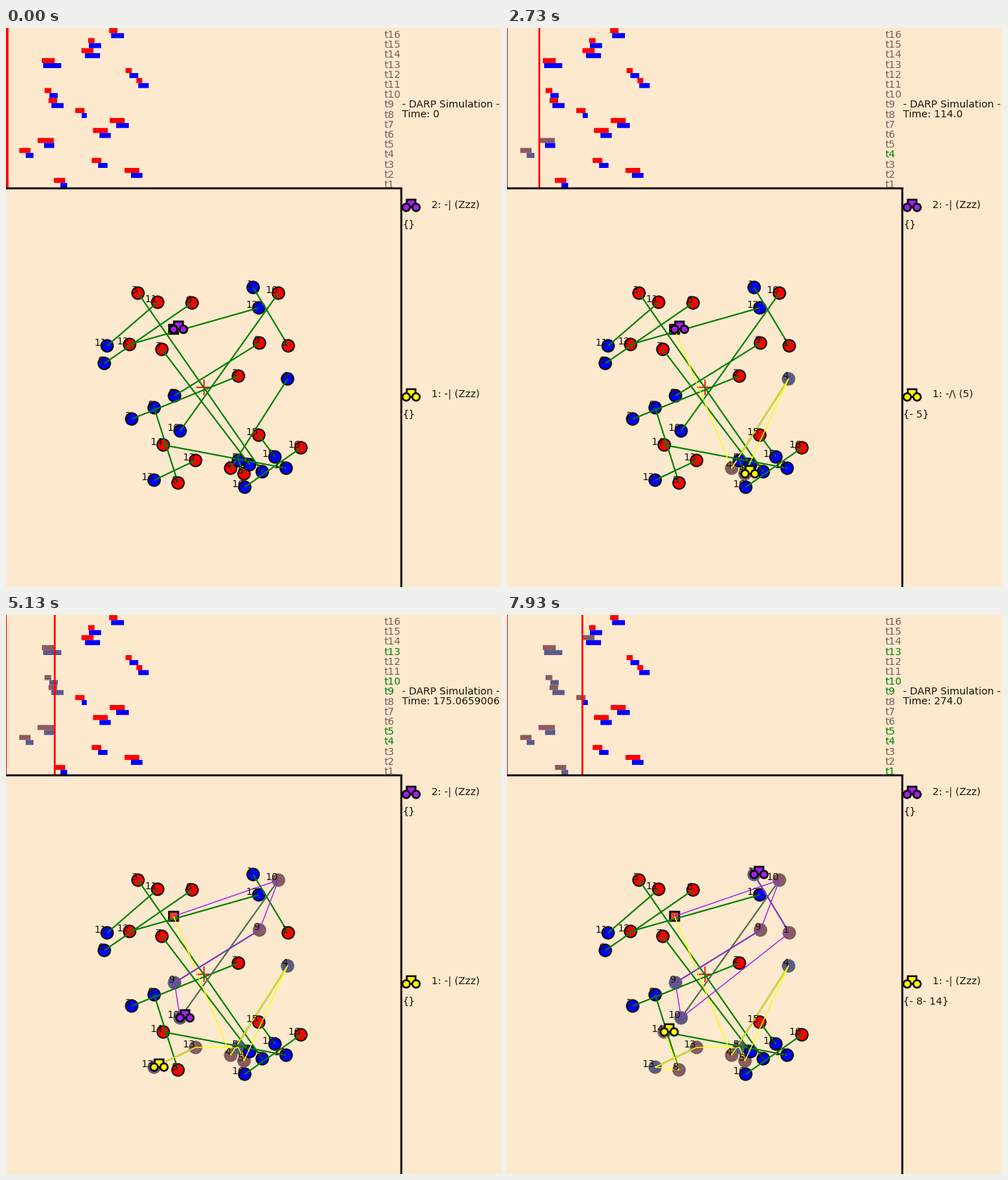
Recreate the animation shown at these times as a matplotlib script. Size 705 by 795 pixels, loop 8 s.

```python
from math import dist

import matplotlib.pyplot as plt
import numpy as np
from matplotlib.animation import FuncAnimation
from matplotlib.patches import Circle, Rectangle

W, H, DPI = 705, 795, 100
FRAMES, STEP_MS = 80, 100
PT = 72 / DPI

PAPER, INK, BLACK = "#fde9ce", "#1e140a", "#0c0806"
RED, BLUE, GREEN = "#ff0000", "#0000ff", "#008000"
FADED_GREEN, LABEL = "#4a6e4a", "#7f5c58"
PICK_DONE, DROP_DONE = ("#8b5a5f", "#74605f"), ("#5a5a8b", "#62606e")
PAINT = {1: "#ffff00", 2: "#a020f0"}

SPEED, SERVICE, RIDE, EARLY = 13.5, 3, 24, 2
DEPOT = (238.7, 428.5)

# pickup x, y, drop-off x, y, opening and length of the tight time window
REQUESTS = [
    (402, 452, 352, 369, 198, 25), (331, 495, 179, 556, 460, 43),
    (188, 377, 365, 631, 338, 35), (320, 626, 401, 499, 69, 29),
    (339, 634, 331, 615, 137, 38), (265, 391, 140, 477, 343, 42),
    (222, 457, 347, 621, 405, 47), (245, 647, 211, 540, 277, 19),
    (361, 448, 240, 523, 153.77, 32), (388, 377, 248, 573, 139, 25),
    (216, 390, 144, 452, 480, 22), (176, 450, 360, 398, 440, 23),
    (270, 615, 211, 643, 129, 48), (224, 593, 399, 626, 276, 45),
    (360, 579, 383, 610, 301, 24), (420, 597, 340, 653, 379, 31),
]

# stops of each car: +n picks request n up, -n drops it off
ROUTES = {1: [4, -4, 5, -5, 13, -13, 8, 14], 2: [10, 9, -9, -10, 1, -1]}

# playback pace: animation step against simulated time
PACE = (0, 18, 35, 44, 57, 65, 79), (0, 111, 137, 155.4, 199.8, 251, 274)


def plan():
    """Site and time window of every stop."""
    sites, windows = {}, {}
    for n, (px, py, dx, dy, start, length) in enumerate(REQUESTS, 1):
        sites[n], sites[-n] = (px, py), (dx, dy)
        end, drive = start + length, dist((px, py), (dx, dy)) / SPEED
        if n <= len(REQUESTS) // 2:  # tight at the drop-off
            windows[n], windows[-n] = (start - RIDE, end - drive), (start, end)
        else:                        # tight at the pickup
            windows[n], windows[-n] = (start, end), (start + drive, end + RIDE)
    return sites, windows


def simulate():
    """Sorted events: time, car, stop reached (0 if none), new goal or None."""
    events = []
    for car, route in ROUTES.items():
        t, pos = 0, DEPOT
        for stop, following in zip(route, route[1:] + [0]):
            opening = windows[stop][0] - (EARLY if stop > 0 else 0)
            start = max(t + dist(pos, sites[stop]) / SPEED, opening)
            t, pos = start + SERVICE, sites[stop]
            goal = max(-following, 0)
            events.append((start, car, stop, goal if stop > 0 else None))
            events.append((t, car, 0, goal))
    return sorted(events, key=lambda e: e[0])


sites, windows = plan()
events = simulate()

fig = plt.figure(figsize=(W / DPI, H / DPI), dpi=DPI, facecolor=PAPER)
ax = fig.add_axes([0, 0, 1, 1])
ax.set(xlim=(0, W), ylim=(H, 0))
ax.axis("off")


def line(xs, ys, color, width, z):
    return ax.plot(xs, ys, color=color, lw=width * PT, zorder=z, snap=False,
                   solid_capstyle="butt")[0]


def label(x, y, text, color=INK, ha="left", z=8):
    return ax.text(x, y, text, color=color, ha=ha, va="baseline", zorder=z,
                   fontsize=14.3 * PT, family="DejaVu Sans")


def disc(x, y, r, face, edge, width, z):
    return ax.add_patch(Circle((x, y), r, fc=face, ec=edge, lw=width * PT, zorder=z))


def box(x, y, w, h, face, edge="none", width=0, z=1):
    return ax.add_patch(Rectangle((x, y), w, h, fc=face, ec=edge, lw=width * PT,
                                  joinstyle="miter", snap=False, zorder=z))


class Car:
    """Body and two wheels; the left wheel sits on the given point."""

    def __init__(self, pos, color, z):
        self.body = box(0, 0, 12.4, 11, color, BLACK, 2.6, z)
        self.wheels = [disc(0, 0, 5.3, color, BLACK, 2.6, z + .1) for _ in range(2)]
        self.move(pos)

    def move(self, pos):
        x, y = pos
        self.body.set_xy((x + .8, y - 11))
        for wheel, dx in zip(self.wheels, (0, 14)):
            wheel.center = (x + dx, y)


def time_x(t):
    return 1.6 + .3834 * t


# schedule, map sites and links
bars, nodes, links, rows = {}, {}, {}, {}
for n in range(1, len(REQUESTS) + 1):
    mid = 222 - 14.2 * (n - 1)
    rows[n] = label(538.5, mid + 5, f"t{n}", LABEL)
    for stop, top, color in ((n, mid - 8.8, RED), (-n, mid - 1.7, BLUE)):
        left, right = map(time_x, windows[stop])
        bars[stop] = box(left, top, right - left, 7.1, color)
        x, y = sites[stop]
        nodes[stop] = disc(x, y, 8.6, color, BLACK, 2, 4)
        label(x, y, str(n), ha="right", z=6.5)
    links[n] = line(*zip(sites[n], sites[-n]), GREEN, 2.1, 5)

line([0, 0], [0, 228], RED, 2, 2)
now = line([0, 0], [0, 228], RED, 2.6, 3)
line([0, 564.4], [228, 228], BLACK, 2.8, 4)
line([563, 563], [228, H], BLACK, 2.8, 4)
box(DEPOT[0] - 6.5, DEPOT[1] - 6.5, 13, 13, "#e6452d", BLACK, 2.6, 4.5)
line([271, 293], [511, 511], "#ff2020", 2, 4.6)
line([282, 282], [500, 522], "#ff2020", 2, 4.6)

trails = {c: line([], [], PAINT[c], 1.4, 5 + c / 10) for c in PAINT}
cars = {c: Car(DEPOT, PAINT[c], 6.6 + c / 2) for c in PAINT}

# side panel
label(564, 113, "- DARP Simulation -")
clock = label(564.3, 127.4, "")
status, load = {}, {}
for c, y in ((2, 255.4), (1, 525)):
    Car((570, y - .3), PAINT[c], 7)
    status[c] = label(606, y, "")
    load[c] = label(564.5, y + 28.4, "")


def update(k):
    limit = np.interp(k, *PACE) + 1e-6
    time, done, goals = 0, {1: [], 2: []}, {1: 0, 2: 0}
    for t, c, stop, goal in events:
        if t > limit:
            break
        time = round(float(t), 7)
        if stop:
            done[c].append(stop)
        if goal is not None:
            goals[c] = goal

    visited = set(done[1] + done[2])
    for stop, node in nodes.items():
        if stop in visited:
            face, edge = PICK_DONE if stop > 0 else DROP_DONE
        else:
            face, edge = RED if stop > 0 else BLUE, BLACK
        node.set(facecolor=face, edgecolor=edge)
        bars[stop].set_facecolor(face)
    for n in links:
        links[n].set_color(FADED_GREEN if -n in visited else GREEN)
        rows[n].set_color(GREEN if -n in visited else LABEL)

    for c, stops in done.items():
        points = [DEPOT] + [sites[s] for s in stops]
        trails[c].set_data(*zip(*points))
        cars[c].move(points[-1])
        aboard = [s for s in stops if s > 0 and -s not in visited]
        load[c].set_text("{" + "".join(f"- {s}" for s in aboard) + "}")
        state = f"-/\\ ({goals[c]})" if goals[c] else "-| (Zzz)"
        status[c].set_text(f"{c}: {state}")

    x = time_x(time) + .7
    now.set_xdata([x, x])
    clock.set_text(f"Time: {time}")
    return []


anim = FuncAnimation(fig, update, frames=FRAMES, interval=STEP_MS,
                     init_func=lambda: update(0), repeat=True, repeat_delay=0)
plt.show()
```
